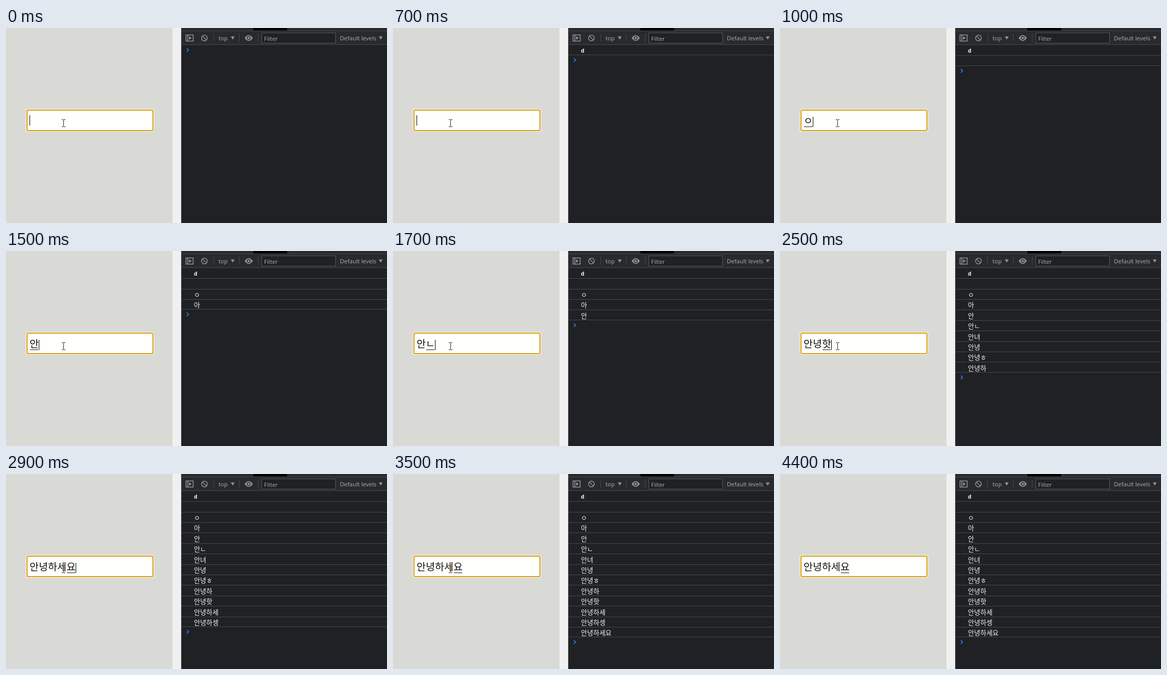
An HTML page for the animation above (4600 ms loop, 744 px wide and 380 px high).

```html
<!DOCTYPE html>
<html lang="ko">
<head>
<meta charset="utf-8">
<title>Input and console</title>
<style>
  html, body { margin: 0; width: 100%; height: 100%; overflow: hidden; background: #d9dad5; }
  svg { display: block; width: 744px; height: 380px; }
  rect { shape-rendering: crispEdges; }
  .soft { shape-rendering: auto; }
  .ui { font: 11.4px "Open Sans", "Noto Sans", sans-serif; fill: #a9adb2; }
  .field { font: 300 19.57px "Noto Sans CJK KR", "Noto Sans CJK", sans-serif; fill: #111; }
  .log { font: 13px "Noto Sans CJK KR", "Noto Sans CJK", sans-serif; fill: #f4f4f4; }
  .latin { font: bold 11px "DejaVu Sans Mono", monospace; }
  .icon { fill: none; stroke: #919498; stroke-width: 1.5; }
  .fill { fill: #919498; }
  .line { fill: #45484c; }
</style>
</head>
<body>
<svg viewBox="0 0 744 380">
  <!-- page -->
  <rect width="325" height="380" fill="#d9dad5"/>
  <rect x="325" width="17" height="380" fill="#f0f0f0"/>
  <rect class="soft" x="39" y="158" width="250" height="44" rx="4" fill="#fff"/>
  <rect class="soft" x="40" y="159" width="248" height="42" rx="3.5" fill="#d99a0b"/>
  <rect class="soft" x="42" y="161" width="244" height="38" rx="1.5" fill="#fffffc"/>
  <text class="field" id="typed" x="46" y="188"></text>
  <rect id="underline" y="192" width="16" height="1" fill="#111"/>
  <rect id="caret" width="1" height="20" fill="#000"/>
  <path id="beam" fill="none" stroke="#222"
    d="M109 178.5h3M113 178.5h3M112.5 179v13M109 192.5h3M113 192.5h3"/>
  <g id="blend">
    <path d="M113.5 177v12" stroke="#e8862c" stroke-width="1.4"/>
    <path d="M112.5 188v4M109 192.5h3M113 192.5h3" stroke="#222"/>
  </g>

  <!-- console -->
  <rect x="342" width="402" height="380" fill="#202124"/>
  <rect x="342" width="402" height="32" fill="#292a2d"/>
  <rect x="342" width="1" height="380" fill="#3c3e42"/>
  <rect x="483" width="66" height="5" fill="#000"/>
  <rect class="line" x="342" y="5" width="402" height="1"/>
  <rect class="line" x="342" y="32" width="402" height="1"/>
  <rect class="line" x="405" y="11" width="1" height="16"/>
  <rect class="line" x="455" y="11" width="1" height="16"/>
  <rect class="line" x="492" y="11" width="1" height="16"/>
  <path class="icon" stroke-width="1.2" d="M351.5 13.5h14v12h-14zM355 13.5v12"/>
  <path class="fill" d="M357.5 16l5 3.5l-5 3.5z"/>
  <g class="icon"><circle cx="387.5" cy="19.5" r="5.6"/><path d="M383.5 15.5l8 8"/></g>
  <text class="ui" x="415" y="24">top</text>
  <path class="fill" d="M439 16.5h7.5l-3.75 6z"/>
  <path class="fill" d="M466 19.5Q474 8.5 482 19.5Q474 30.5 466 19.5z"/>
  <circle cx="474" cy="19.5" r="3.7" fill="#292a2d"/>
  <circle class="fill" cx="474" cy="19.5" r="2.2"/>
  <rect x="499" y="9" width="145" height="21" fill="#55585c"/>
  <rect x="500" y="10" width="143" height="19" fill="#202124"/>
  <text class="ui" x="504" y="25">Filter</text>
  <text class="ui" x="652" y="24">Default levels</text>
  <path class="fill" d="M728 16.5h7.5l-3.75 6z"/>
  <g id="rows"></g>
  <path id="prompt" d="M353 -3.5l3.6 3.5l-3.6 3.5" fill="none" stroke="#2a86ee" stroke-width="1.6"/>
</svg>
<script>
const LOOP = 4600;
const LOGS = ['d', '', 'ㅇ', '아', '안', '안ㄴ', '안녀', '안녕', '안녕ㅎ',
  '안녕하', '안녕핫', '안녕하세', '안녕하셍', '안녕하세요'];

// [start ms, field text, logged lines]
const STEPS = [
  [0, '', 0], [100, 'd', 0], [300, 'd', 1], [700, '', 1], [800, '', 2],
  [900, 'ㅇ', 2], [1300, 'ㅇ', 3], [1400, '아', 4], [1500, '안', 4],
  [1600, '안', 5], [1700, '안ㄴ', 5], [1800, '안녀', 6], [1900, '안녕', 8],
  [2200, '안녕ㅎ', 8], [2300, '안녕ㅎ', 9], [2400, '안녕하', 10],
  [2500, '안녕핫', 10], [2600, '안녕하세', 12], [2700, '안녕하셍', 13],
  [2900, '안녕하세요', 13], [3000, '안녕하세요', 14]
];

const $ = id => document.getElementById(id);
const set = (el, attrs) => {
  for (const key in attrs) el.setAttribute(key, attrs[key]);
  return el;
};
const add = (parent, tag, attrs) =>
  parent.appendChild(set(document.createElementNS('http://www.w3.org/2000/svg', tag), attrs));
const show = (el, on) => set(el, { visibility: on ? 'visible' : 'hidden' });

const rowEnd = n => Math.round(32.8 + 20.4 * n);

const rows = LOGS.map((line, i) => {
  const g = add($('rows'), 'g', {});
  const end = rowEnd(i + 1);
  const latin = line === 'd';
  add(g, 'text', { class: latin ? 'log latin' : 'log', x: 367, y: end - (latin ? 5 : 4) }).textContent = line;
  const rule = add(g, 'rect', { class: 'line', x: 343, width: 401, height: 1 });
  return { g, rule, end };
});

function drawField(text) {
  const n = text.length;
  const hangul = n > 0 && text !== 'd';
  $('typed').textContent = text;
  set($('caret'), {
    x: hangul ? 46 + 18 * n : n ? 58 : 46,
    y: hangul ? 173 : 170
  });
  set($('underline'), { x: 29 + 18 * n });
  show($('underline'), hangul);
}

function drawLog(count) {
  rows.forEach(({ g, rule, end }, i) => {
    show(g, i < count);
    // the last rule sits one pixel higher
    set(rule, { y: end - (i === count - 1 ? 1 : 0) });
  });
  const y = count ? rowEnd(count) + 9.5 : 43;
  set($('prompt'), { transform: `translate(0 ${y})` });
}

let current;
function frame() {
  const t = performance.now() % LOOP;
  const step = STEPS.findLast(s => s[0] <= t);
  if (step !== current) {
    current = step;
    drawField(step[1]);
    drawLog(step[2]);
  }
  show($('caret'), t < 3500 || (t >= 4000 && t < 4400));
  show($('beam'), t < 2900);
  show($('blend'), t >= 2900 && t < 3700);
  requestAnimationFrame(frame);
}
frame();
</script>
</body>
</html>
```
